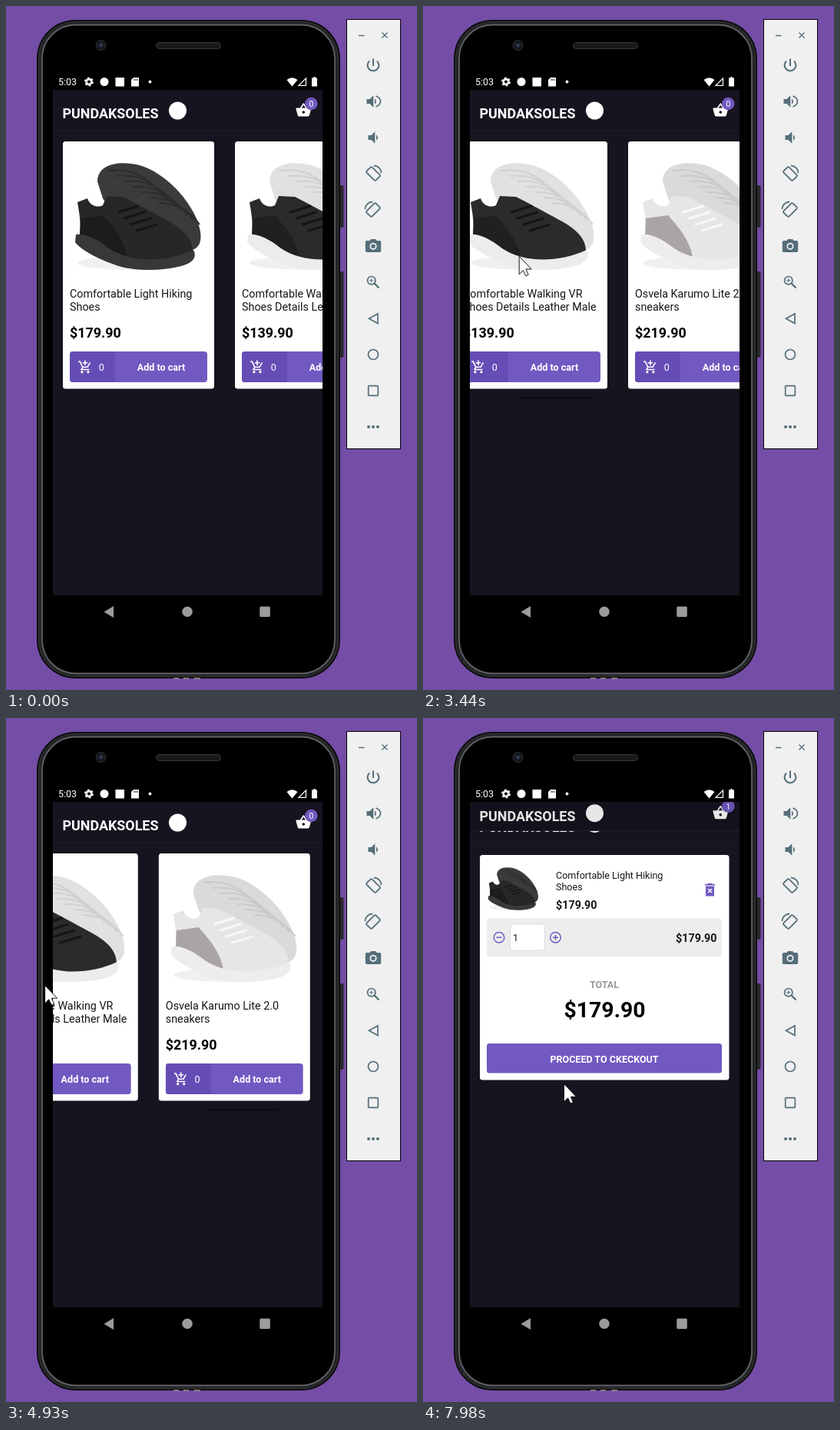
Recreate the animation shown at these times as an HTML page. Size 535 by 889 pixels, loop 8000 ms.

```html
<!DOCTYPE html>
<html lang="en">
<head>
<meta charset="utf-8">
<title>Shoe shop</title>
<style>
html, body { margin: 0; width: 100%; height: 100%; overflow: hidden; background: #744da6; }
svg { display: block; width: 100vw; height: 100vh; }
text { font-family: Roboto, sans-serif; font-size: 14.33px; fill: #161618; white-space: pre; }
.b { font-weight: 700; }
.s { font-size: 12.54px; }
.m { text-anchor: middle; }
.e { text-anchor: end; }
.l { font-size: 17.9px; }
.w { fill: #fff; }
</style>
</head>
<body>
<svg viewBox="0 0 535 889">
  <defs>
    <clipPath id="app"><rect x="61" y="109" width="351" height="657"/></clipPath>
    <clipPath id="reveal"><rect id="window" x="61" y="766" width="351" height="657"/></clipPath>
    <clipPath id="button"><rect x="83" y="449" width="179" height="40" rx="4"/></clipPath>
    <path id="basket" d="M17.21 9l-4.38-6.56c-.19-.28-.51-.42-.83-.42-.32 0-.64.14-.83.43L6.79 9H2c-.55 0-1 .45-1 1 0 .09.01.18.04.27l2.54 9.27c.23.84 1 1.46 1.92 1.46h13c.92 0 1.69-.62 1.93-1.46l2.54-9.27L23 10c0-.55-.45-1-1-1h-4.79zM9 9l3-4.4L15 9H9zm3 8c-1.1 0-2-.9-2-2s.9-2 2-2 2 .9 2 2-.9 2-2 2z"/>
    <g id="cart" fill="none" stroke="#fff" stroke-width="2">
      <path d="M12 1v8M8 5h8M1 3h2.7L8 12h8L20.200 4.500M8 12l-2 4h13"/>
      <circle cx="7" cy="20" r="1"/><circle cx="17" cy="20" r="1"/>
    </g>
    <g id="turn" fill="none" stroke="#546e7a" stroke-width="1.8">
      <rect x="-5" y="-8.5" width="10" height="17" rx="1.5" transform="rotate(-45)"/>
      <path d="M1-10.5C7-10 10.5-6 10.5-1"/>
    </g>
  </defs>

  <!-- phone -->
  <rect x="434" y="233" width="5.5" height="55" rx="2" fill="#29292c"/>
  <rect x="434" y="345" width="5.5" height="112" rx="2" fill="#29292c"/>
  <rect x="40" y="18" width="395" height="856" rx="50" fill="#0e0e0f"/>
  <rect x="42.500" y="20.500" width="390" height="851" rx="47.500" fill="#232326" stroke="#38383c"/>
  <rect x="47" y="24.500" width="381" height="843" rx="43.500" fill="#000" stroke="#606167" stroke-width="1.800"/>
  <path d="M218 874h7m6 0h7m7 0h8" stroke="#85858a" stroke-width="2"/>
  <circle cx="123.5" cy="51" r="6.5" fill="#17171b" stroke="#303036"/>
  <circle cx="123.5" cy="51" r="2.5" fill="#2b3954"/>
  <rect x="195.5" y="47.5" width="84" height="8" rx="4" fill="#19191b" stroke="#36363a"/>

  <!-- status bar -->
  <g class="w">
    <text class="s w" x="68" y="103">5:03</text>
    <g fill="none" stroke="#fff">
      <circle cx="108" cy="98.5" r="3.4" stroke-width="2.6"/>
      <circle cx="108" cy="98.5" r="5.2" stroke-width="1.6" stroke-dasharray="2.72"/>
      <path d="M381 103.4h9.5V94z" stroke-width="1.2"/>
    </g>
    <circle cx="128" cy="98.5" r="5.5"/>
    <rect x="142.5" y="93" width="11.5" height="11.5"/>
    <path d="M166 93h7v11.5h-10V96z"/>
    <path d="M167 94.5v2.5m2-2.5v2.5m2-2.5v2.5" stroke="#000" stroke-width=".8"/>
    <circle cx="187.5" cy="98.5" r="1.9"/>
    <path d="M365.5 96Q372.5 90.5 379.5 96L372.5 104.5z"/>
    <path d="M398 93.5h2V92.3h3v1.2h2V104.5h-7z"/>
  </g>

  <g clip-path="url(#app)">
    <rect x="61" y="109" width="351" height="657" fill="#15141f"/>
    <g id="shop">
      <g id="list"></g>
      <rect id="bar" x="61" y="508" width="91.7" height="3" fill="#0d0d12"/>
      <ellipse id="glow" cx="61" cy="337" rx="34" ry="174" fill="#777"/>
      <g class="header"></g>
    </g>
    <rect id="dim" x="61" y="109" width="351" height="657"/>
    <g clip-path="url(#reveal)">
      <rect x="61" y="109" width="351" height="657" fill="#15141f"/>
      <g id="checkout">
        <g class="header"></g>
        <rect x="74" y="176.5" width="324.5" height="292.5" rx="3.5" fill="#fff"/>
        <g id="thumb" transform="translate(48.6 111) scale(.4)"></g>
        <text class="s" x="173" y="207.5">Comfortable Light Hiking</text>
        <text class="s" x="173" y="222.5">Shoes</text>
        <text class="b" x="173" y="246">$179.90</text>
        <path d="M368 217h11v13h-11zM367 214.300h3.500l1-1h4l1 1h3.500v1.700h-13z" fill="#7159c1"/>
        <path d="M371 220.500l5 5m0-5l-5 5" stroke="#fff" stroke-width="1.400"/>
        <rect x="83" y="259" width="306" height="49.5" rx="3.5" fill="#ededed"/>
        <g fill="none" stroke="#7159c1" stroke-width="1.5">
          <circle cx="99" cy="283.7" r="6.8"/><path d="M95.5 283.7h7"/>
          <circle cx="172.5" cy="283.7" r="6.8"/><path d="M169 283.7h7m-3.5-3.5v7"/>
        </g>
        <rect x="113.5" y="266.5" width="45" height="34" rx="3" fill="#fff" stroke="#ddd"/>
        <text class="s" x="117" y="288.5">1</text>
        <text class="b e" x="382.5" y="289">$179.90</text>
        <text class="s b m" x="236" y="349" style="fill:#999">TOTAL</text>
        <text class="b m" x="236.5" y="387.5" style="font-size:28.4px;fill:#000">$179.90</text>
        <rect x="83" y="421.5" width="306" height="38.5" rx="3.5" fill="#7159c1"/>
        <text class="s b m w" x="236" y="446">PROCEED TO CKECKOUT</text>
      </g>
      <rect id="edge" x="61" width="351" height="1" fill="#24232d"/>
    </g>
  </g>

  <!-- navigation bar -->
  <g fill="#9c9c9c">
    <path d="M127.5 787.5L140 780v15z"/>
    <circle cx="236" cy="787.3" r="6.7"/>
    <rect x="330.3" y="780.5" width="13.5" height="13.5" rx="1.5"/>
  </g>

  <!-- emulator toolbar -->
  <rect x="443.5" y="17.5" width="70" height="558" fill="#f0f0f0" stroke="#000"/>
  <g fill="none" stroke="#546e7a" stroke-width="1.7">
    <path d="M459 38.5h7.5M489.5 34.5l7 7m0-7l-7 7" stroke-width="1.3"/>
    <path d="M478 68.500v9.500M473 71.400A7.400 7.400 0 1 0 483 71.400" stroke-width="2"/>
    <path d="M481.500 117Q487.500 119.500 487.500 124T481.500 131"/>
    <path d="M484 400v12.5L472.5 406.2z"/>
    <circle cx="478" cy="453" r="6.5"/>
    <rect x="471.7" y="493.7" width="12.6" height="12.6" rx=".8"/>
    <circle cx="475.700" cy="356.700" r="5.200"/>
    <path d="M479.500 360.500l6 6" stroke-width="2.400"/>
    <path d="M473 356.700h5.400m-2.700-2.700v5.400" stroke-width="1"/>
  </g>
  <g fill="#546e7a">
    <path d="M469.500 121h4l4.800-4.800v15.600l-4.800-4.800h-4zM480 120.200q4 3.800 0 7.600z"/>
    <path d="M471.500 168h4l4.800-4.800v15.600l-4.800-4.800h-4zM482 167.200q4 3.800 0 7.600z"/>
    <path d="M475 303h6l1.800 2h3.700q1.700 0 1.700 1.700v11.600q0 1.700-1.700 1.700h-17q-1.700 0-1.700-1.700v-11.600q0-1.700 1.700-1.700h3.700z"/>
    <circle cx="478" cy="312.300" r="3.700" stroke="#f0f0f0" stroke-width="1.800"/>
    <circle cx="472" cy="547" r="2"/><circle cx="478" cy="547" r="2"/><circle cx="484" cy="547" r="2"/>
  </g>
  <use href="#turn" x="478" y="218"/>
  <use href="#turn" transform="translate(478 265) scale(-1 1)"/>

  <circle id="click" cx="183" cy="475" r="18" fill="#ebd728" fill-opacity=".6"/>
  <path id="cursor" d="M.5.5V24L5.6 18.8 9 26 12.5 24.6 9.3 17.3H16.5Z" fill="#fff" stroke="#000" stroke-width=".9"/>
</svg>

<script>
const $ = id => document.getElementById(id);
const all = sel => document.querySelectorAll(sel);

const header = `
  <rect x="61" y="96" width="351" height="67" fill="#15141f"/>
  <path d="M61 162.5h351" stroke="#1d1c27"/>
  <text class="l b w" x="73.5" y="146">PUNDAKSOLES</text>
  <circle cx="223.5" cy="136" r="11.5" fill="#fff"/>
  <use href="#basket" transform="translate(376.5 124.5) scale(.9)" fill="#fff"/>
  <circle cx="397.3" cy="127" r="8.3" fill="#7159c1"/>
  <text class="count m w" x="397.3" y="131" style="font-size:10.8px">0</text>`;
all('.header').forEach(g => g.innerHTML = header);

const ridges = Array.from({ length: 7 }, (_, i) =>
  `M${132 + 11 * i} ${214 + 7 * i}q${46 - 2 * i} ${i - 6} ${72 - 3 * i} ${34 - i}`).join('');
const laces = [0, 1, 2, 3].map(i => `M${146 + 8 * i} ${268 + 8 * i}l26-8`).join('');

const shoe = ({ back, ridge, upper, sole, lace, heel }) => `
  <ellipse cx="165" cy="334" rx="72" ry="9" fill="#f0f0f0"/>
  <path d="M119 228C119 206 146 200 174 207C204 216 232 244 246 272C257 296 257 316 238 318C200 304 140 272 126 250Z" fill="${back}"/>
  <path d="${ridges}" fill="none" stroke="${ridge}" stroke-width="2"/>
  <path d="M93 255L106 250C109 259 118 263 126 259L131 247L152 248C168 256 190 268 212 280C232 291 244 304 243 320C236 334 205 340 182 336L95 304C99 284 95 268 93 255Z" fill="${upper}"/>
  <path d="M97 276L126 272C140 288 154 304 158 326L120 312L96 300Z" fill="${heel}"/>
  <path d="${laces}" stroke="${lace}" stroke-width="3" stroke-linecap="round"/>
  <path d="M91 297C102 295 118 302 134 315C160 333 205 335 244 317C249 327 243 334 228 338C202 345 170 344 150 339C124 331 98 318 90 307Z" fill="${sole}"/>`;

const hiking = { name: ['Comfortable Light Hiking', 'Shoes'], price: '$179.90',
  back: '#3b3b3d', ridge: '#2c2c2e', upper: '#272729', sole: '#38383a', lace: '#151517', heel: '#1c1c1e' };
const walking = { name: ['Comfortable Walking VR', 'Shoes Details Leather Male'], price: '$139.90',
  back: '#e1e1e3', ridge: '#d0d0d3', upper: '#2b2b2d', sole: '#ececee', lace: '#151517', heel: '#202022' };
const lite = { name: ['Osvela Karumo Lite 2.0', 'sneakers'], price: '$219.90',
  back: '#dadadc', ridge: '#cacacc', upper: '#e6e6e9', sole: '#ededef', lace: '#f8f8f8', heel: '#aaa4a5' };

const card = (p, i) => `<g transform="translate(${224 * i})">
  <rect x="74" y="176" width="197" height="321.5" rx="3.5" fill="#fff"/>
  ${shoe(p)}
  <text x="83" y="379">${p.name[0]}</text><text x="83" y="396">${p.name[1]}</text>
  <text class="l b" x="83" y="431" style="fill:#000">${p.price}</text>
  <g clip-path="url(#button)">
    <rect x="83" y="449" width="179" height="40" fill="#7159c1"/>
    <rect x="83" y="449" width="59" height="40" fill="#654db5"/>
    <use href="#cart" transform="translate(93.3 459.7) scale(.8)"/>
    <text class="s m w ${i ? '' : 'count'}" x="124.3" y="474">0</text>
    <text class="s b m w" x="202" y="474">Add to cart</text>
    ${i ? '' : '<rect id="ripple" x="83" y="449" width="179" height="40"/>'}
  </g></g>`;
$('list').innerHTML = [hiking, walking, lite, walking, lite, walking].map(card).join('');
$('thumb').innerHTML = shoe(hiking);

// The screen updates every 75 ms, counted afresh from each new action.
const actions = [660, 1040, 1740, 2290, 3210, 4310, 5240, 6100, 6960, 7260, 7800];
function snap(t) {
  const from = actions.filter(a => a <= t).pop();
  return from === undefined ? 0 : from + 75 * Math.floor((t - from) / 75 + .3);
}

const ramp = (t, a, b) => Math.min(1, Math.max(0, (t - a) / (b - a)));
const smooth = p => p * p * (3 - 2 * p);
const slowDown = p => 1 - (1 - p) ** 2;

// Each leg: start, end, then the values it arrives at.
const pointer = [[580, 890, 296, 576], [965, 1580, 192, 352], [1665, 2040, 352, 343],
  [2215, 2660, 169, 315], [2660, 3030, 305, 344], [3135, 3520, 99, 322], [3520, 4150, 303, 348],
  [4230, 4600, 5, 306], [4600, 5090, 70, 365], [5165, 5640, 378, 381], [5640, 6730, 183, 475]];
const swipes = [[2290, 3030, 149], [3210, 4000, 366], [4310, 5090, 794], [5324, 6030, 0]];

const follow = (legs, first, t, ease) => legs.reduce((pos, [a, b, ...to]) =>
  pos.map((v, i) => v + (to[i] - v) * ease(ramp(t, a, b))), first);

// cubic-bezier(.20833, .82, .25, 1)
function settle(x) {
  const curve = (u, p, q) => 3 * u * (1 - u) * ((1 - u) * p + u * q) + u ** 3;
  let lo = 0, hi = 1;
  for (let i = 0; i < 24; i++) {
    const mid = (lo + hi) / 2;
    if (curve(mid, .20833, .25) < x) lo = mid; else hi = mid;
  }
  return curve(lo, .82, 1);
}

const move = (id, x, y) => $(id).setAttribute('transform', `translate(${x} ${y})`);
const fade = (id, o) => $(id).setAttribute('opacity', o);

function draw(now) {
  const t = snap(now % 8000);
  const [x] = follow(swipes, [0], t, slowDown);
  move('list', -x, 0);
  move('bar', x * .2614, 0);
  fade('bar', ramp(t, 2215, 2440) - ramp(t, 6100, 6400));
  fade('glow', .2 * (ramp(t, 5900, 6030) - ramp(t, 6030, 6730)));

  move('cursor', ...follow(pointer, [441, 905], t, smooth));
  fade('click', t >= 6960 && t < 7110 ? 1 : 0);
  fade('ripple', .16 * (ramp(t, 6960, 7110) - ramp(t, 7185, 7410)));

  const p = settle(ramp(t, 7735, 8160)), rest = 657 * (1 - p);
  move('shop', 0, -13 * p);
  fade('dim', .1 * p);
  move('checkout', 0, .041 * rest);
  $('window').setAttribute('y', 109 + rest);
  $('edge').setAttribute('y', 109 + rest);
  all('.count').forEach(e => e.textContent = t >= 7800 ? 1 : 0);
}

const start = performance.now();
function tick() {
  draw(performance.now() - start);
  requestAnimationFrame(tick);
}
tick();
</script>
</body>
</html>
```
